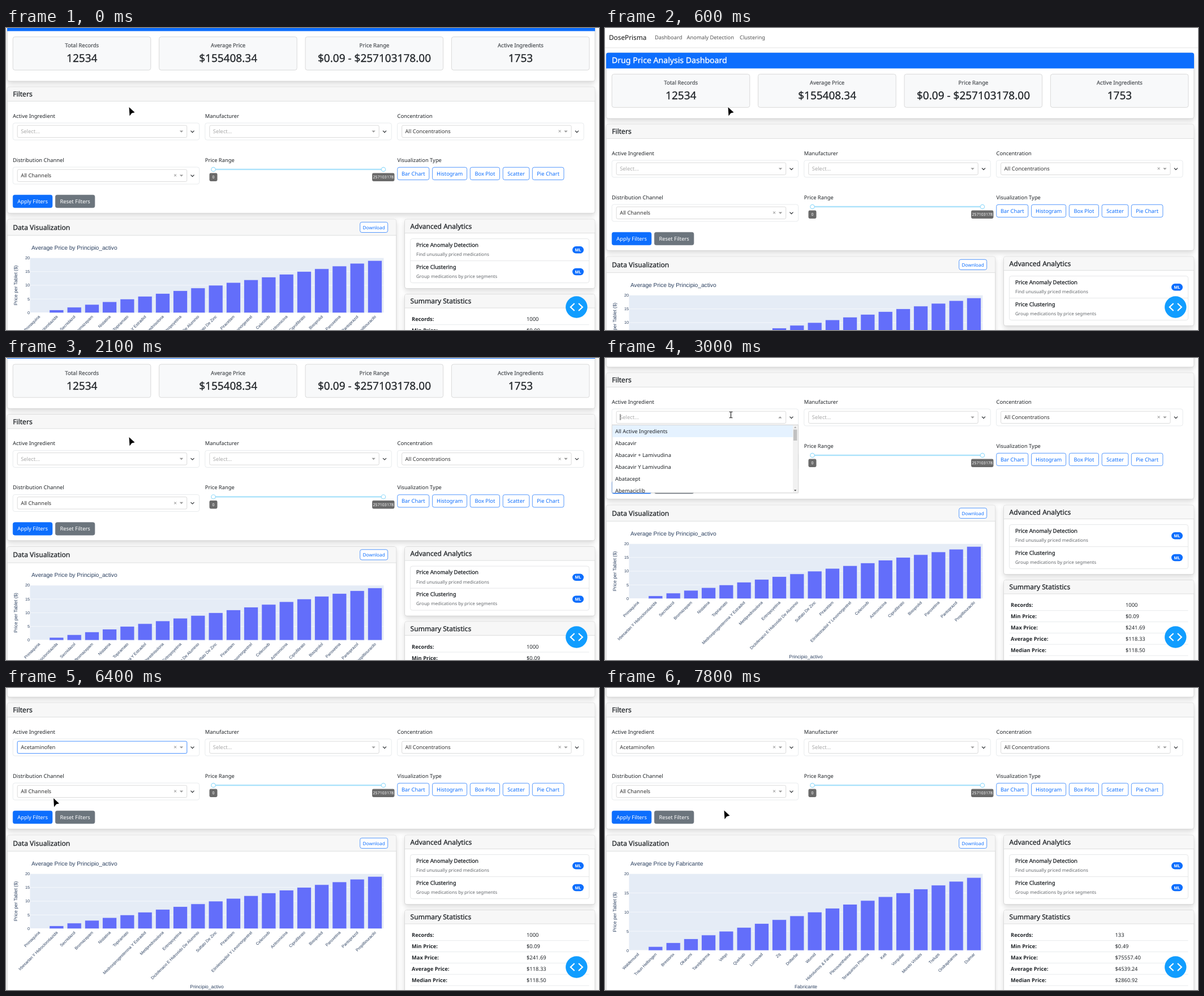
An HTML page that plays this animation: 1048x534 px, repeating every 8000 ms.

```html
<!DOCTYPE html>
<html lang="en">
<head>
<meta charset="utf-8">
<title>Drug Price Analysis Dashboard</title>
<style>
  html, body { margin: 0; width: 100%; height: 100%; overflow: hidden; background: #fff; }
  svg { display: block; width: 1048px; height: 534px; color: #212529; }
  text { font: 9.35px "Noto Sans", sans-serif; fill: currentColor; white-space: pre; text-rendering: geometricPrecision; }
  .medium { stroke: currentColor; stroke-width: .3px; }
  .bold { font-weight: 700; }
  .chart { font-family: "Liberation Sans", Arial, sans-serif; color: #2a3f5f; }
  .mid { text-anchor: middle; }
  .end { text-anchor: end; }
  .shadow { filter: drop-shadow(0 4.8px 4.8px rgba(0, 0, 0, .15)); }
</style>
</head>
<body>
<svg id="stage" viewBox="0 0 1048 534"></svg>
<script>
const LOOP = 8000, STEP = 100;
const BLUE = '#0d6efd', GRAY = '#6c757d', INK = '#212529', BORDER = '#d3d4d5';
const stage = document.getElementById('stage');

const INGREDIENTS = {
  title: 'Principio_activo', bottom: 569.5, valueX: 920,
  names: ['Primaquina', 'Irbesartan Y Hidroclorotiazida', 'Secnidazol', 'Bromazepam', 'Nistatina',
    'Topiramato', 'Medroxiprogesterona Y Estradiol', 'Metilprednisolona', 'Eritropoyetina',
    'Diclofenaco E Hidroxido De Aluminio', 'Sulfato De Zinc', 'Piracetam',
    'Etinilestradiol Y Levonorgestrel', 'Celecoxib', 'Azitromicina', 'Ciprofibrato', 'Bisoprolol',
    'Paroxetina', 'Pantoprazol', 'Propiltiouracilo'],
  stats: ['1000', '$0.09', '$241.69', '$118.33', '$118.50']
};
const MAKERS = {
  title: 'Fabricante', bottom: 608, valueX: 901.5,
  names: ['Waldemund', 'Traun Helbingen', 'Brestonix', 'Okarumi', 'Tarelpharma', 'Velqo', 'Quelvab',
    'Lumovad', 'Zq', 'Dolterfar', 'Wumid', 'Hidrolumos &amp; Farma', 'Plexovantheline',
    'Teraquinico Pharma', 'Kelt', 'Vorquilar', 'Morelo Vintalis', 'Trelups', 'Ondrapharma', 'Dulmar'],
  stats: ['133', '$0.49', '$75557.40', '$4539.24', '$2860.92']
};
const OPTIONS = {
  all: ['All Active Ingredients', 'Abacavir', 'Abacavir + Lamivudina', 'Abacavir Y Lamivudina', 'Abatacept', 'Abemaciclib'],
  ace: ['Acarbosa', 'Aceclofenaco', 'Acemetacina', 'Acetaminofen', 'Acetaminofen + Cafeina + Metocarbamol', 'Acetazolamida'],
  acet: ['', ' + Acido Acetilsalicilico + Cafeina', ' + Cafeina + Acido Acetilsalicilico',
    ' + Cafeina + Clorfeniramina', ' + Cafeina + Fenilefrina', ' + Cafeina + Feniñefrina'].map(s => 'Acetaminofen' + s)
};
// time, x, y of the pointer tip
const POINTER = [[0, 217.5, 140], [2100, 217.5, 140], [2400, 222.5, 100.5], [4900, 222.5, 100.5], [5200, 76, 154.5],
  [5400, 58, 146], [5700, 46, 131], [5900, 46, 131], [6400, 84, 195], [6800, 66, 223.5], [7500, 66, 223.5], [7800, 210.5, 216.5]];

const smooth = (from, to, t) => {
  const u = Math.min(1, Math.max(0, (t - from) / (to - from)));
  return u * u * (3 - 2 * u);
};

function pointerAt(t) {
  const next = POINTER.findIndex(k => k[0] > t);
  if (next < 0) return POINTER[POINTER.length - 1].slice(1);
  const [a, b] = [POINTER[next - 1], POINTER[next]], u = (t - a[0]) / (b[0] - a[0]);
  return [a[1] + (b[1] - a[1]) * u, a[2] + (b[2] - a[2]) * u];
}

const rect = (x, y, w, h, fill, stroke = 'none', r = 0, extra = '') =>
  `<rect x="${x}" y="${y}" width="${w}" height="${h}" fill="${fill}" stroke="${stroke}" stroke-width=".7" rx="${r}" ${extra}/>`;
const text = (x, y, s, cls = '', color = '', size = 9.35, extra = '') =>
  `<text x="${x}" y="${y}" class="${cls}" style="font-size:${size}px;${color && 'color:' + color}" ${extra}>${s}</text>`;
const path = (d, stroke, width = 1, fill = 'none', extra = '') =>
  `<path d="${d}" fill="${fill}" stroke="${stroke}" stroke-width="${width}" ${extra}/>`;
const group = (x, y, body) => `<g transform="translate(${x} ${y})">${body}</g>`;

const button = (x, y, w, h, label, fill, color, stroke = fill, size) =>
  rect(x, y, w, h, fill, stroke, 3.2) + text(x + w / 2, y + h / 2 + 3.4, label, 'mid', color, size);

function card(x, y, w, h, headHeight, title) {
  return rect(x, y, w, h, '#fff', '#ccc', 3.6, 'class="shadow"') +
    rect(x + .4, y + .4, w - .8, headHeight, '#f7f7f7', 'none', 3) +
    path(`M${x} ${y + headHeight}h${w}`, BORDER, .7) +
    text(x + 10, y + headHeight / 2 + 4.5, title, 'medium', INK, 12.05);
}

function select(x, y, value, { clear = !!value, focus = false, open = false, typed = '', caret = false } = {}) {
  const tip = open ? 'M294 16.6l3.2-3.4 3.2 3.4z' : 'M294.6 13.4l3.2 3.4 3.2-3.4z';
  return group(x, y,
    rect(0, 0, 329.5, 30, '#fff', '#dee2e6', 3.6) +
    (focus ? rect(7, 3.4, 301.5, 23, '#d6e8ff', 'none', 3) : '') +
    rect(8, 4.2, 299.5, 21.4, '#fff', focus ? '#1a75ff' : '#ccc', 2.4) +
    text(14, 18.1, value || typed || 'Select...', '', value ? '#333' : typed ? '#000' : '#aaa') +
    (caret ? rect(14.4 + 5 * typed.length, 9, .7, 11, '#000') : '') +
    (clear ? text(287, 18.3, '×', 'mid', '#888', 10) : '') +
    path(tip, 'none', 0, '#999') +
    path('M314.3 13.6l3 3 3-3', INK, 1.1));
}

function menu(options, active) {
  return rect(12.8, 262.6, 328.4, 119.6, '#fff', '#ccc', 0, 'style="filter:drop-shadow(0 .6px .8px rgba(0,0,0,.15))"') +
    rect(13.2, 263 + 21 * active, 319, 21, '#e5f2ff') +
    `<svg x="13" y="263" width="319" height="119">` +
    options.map((s, i) => text(5, 14.3 + 21 * i, s)).join('') + '</svg>' +
    rect(332, 263, 8.8, 118.8, '#f1f1f1') + rect(333, 270.5, 6.4, 19.5, '#c1c1c1') +
    path('M334 267.8l2.2-2.6 2.2 2.6z', 'none', 0, '#a3a3a3') +
    path('M334 377l2.2 2.6 2.2-2.6z', 'none', 0, '#505050');
}

function chart({ title, bottom, names }) {
  const left = 42.5, top = 472.4, width = 625, gap = width / 20, unit = (bottom - top) / 20;
  let out = text(45, 458, 'Average Price by ' + title, 'chart', '', 10.2) +
    rect(left, top, width, bottom - top, '#e5ecf6');
  for (let v = 0; v <= 20; v += 5) {
    const y = bottom - v * unit;
    out += path(`M${left} ${y}h${width}`, '#fff', v ? .6 : 1.2) + text(42, y + 2.5, v, 'chart end', '', 7.2);
  }
  names.forEach((name, i) => {
    const cx = left + gap * (i + .5), x = cx + 2.5, y = bottom + 7.5;
    out += rect(cx - gap * .4, bottom - i * unit, gap * .8, i * unit, '#636efa', '#e5ecf6') +
      text(x, y, name, 'chart end', '', 7.2, `transform="rotate(-45 ${x} ${y})"`);
  });
  const cy = (top + bottom) / 2;
  return out + text(20, cy, 'Price per Tablet ($)', 'chart mid', '', 8.4, `transform="rotate(-90 20 ${cy})"`) +
    text(355, 675, title, 'chart mid', '', 8.5);
}

function header() {
  const facts = [['Total Records', '12534'], ['Average Price', '$155408.34'],
    ['Price Range', '$0.09 - $257103178.00'], ['Active Ingredients', '1753']];
  return rect(0, -10, 1048, 44, '#fff', 'none', 0, 'style="filter:drop-shadow(0 1.2px 1.2px rgba(0,0,0,.1))"') +
    text(7, 20.8, 'DosePrisma', '', '#111', 11.8) +
    [[88, 'Dashboard'], [144.5, 'Anomaly Detection'], [238, 'Clustering']].map(([x, s]) => text(x, 20, s, '', '#555')).join('') +
    rect(2.3, 44, 1038.5, 116, '#fff', '#ccc', 3.6, 'class="shadow"') +
    path('M2 71.5V47.4q0-3.6 3.6-3.6H1037.4q3.6 0 3.6 3.6V71.5z', 'none', 0, BLUE) +
    text(12, 61.6, 'Drug Price Analysis Dashboard', 'medium', '#fff', 14.1) +
    facts.map(([label, value], i) => group(12.2 + 258.4 * i, 81.6,
      rect(0, 0, 243.6, 58.8, '#f8f9fa', '#ccc', 3.6) +
      text(122, 18.6, label, 'mid medium', '#585c60', 9.5) +
      text(122, 44.6, value, 'mid medium', INK, 19))).join('');
}

function filters(t, over) {
  const open = t >= 3000 && t < 5900, chosen = t >= 5900;
  const typed = open ? 'Acet'.slice(0, [3800, 4100, 4300, 4800].filter(k => t >= k).length) : '';
  const focus = t >= 2600 && t < 7000 && !open;
  const caret = open && !(t >= 3300 && t < 3800);
  const labels = ['Active Ingredient', 'Manufacturer', 'Concentration', 'Distribution Channel', 'Price Range', 'Visualization Type'];
  const kinds = [[691.8, 56, 'Bar Chart'], [753.6, 61, 'Histogram'], [820.3, 52.2, 'Box Plot'], [878.2, 46.6, 'Scatter'], [930.3, 55.6, 'Pie Chart']];
  const tag = (x, w, s) => rect(x - w / 2, 322.6, w, 14.4, '#6a6a6a', 'none', 2.4) + text(x, 332.4, s, 'mid', '#fff', 7.1);
  const knob = x => `<circle cx="${x}" cy="316" r="3.7" fill="#fff" stroke="#96dbfa" stroke-width="1.2"/>`;
  return card(2.3, 170.2, 1038.5, 223.2, 25.2, 'Filters') +
    labels.map((s, i) => text(12 + 339.75 * (i % 3), i < 3 ? 225 : 303, s)).join('') +
    select(12.2, 234, chosen ? 'Acetaminofen' : '', { focus, open, typed, caret }) +
    select(351.8, 234, '') + select(691.6, 234, 'All Concentrations') + select(12.2, 312, 'All Channels') +
    rect(366.5, 314.8, 300.5, 2.4, '#abe2fb') + knob(366.5) + knob(667) +
    tag(366.5, 14, '0') + tag(666.8, 39.4, '257103178') +
    kinds.map(([x, w, s]) => button(x, 312.3, w, 22.2, s, '#fff', BLUE, BLUE)).join('') +
    button(12.3, 361.3, 69.6, 22.4, 'Apply Filters', over === 'apply' ? '#0b5ed7' : BLUE, '#fff') +
    button(87.3, 361.3, 69.6, 22.4, 'Reset Filters', over === 'reset' ? '#5c636a' : GRAY, '#fff');
}

function analytics({ stats, valueX }) {
  const item = (y, title, note) => text(725, y, title, 'medium', INK, 9.55) + text(725, y + 16.2, note, '', '#65696d', 8.06) +
    rect(1001, y - .8, 20, 12.4, BLUE, 'none', 6.2) + text(1011, y + 8, 'ML', 'mid bold', '#fff', 7.2);
  const labels = ['Records:', 'Min Price:', 'Max Price:', 'Average Price:', 'Median Price:'];
  return card(704.6, 404.2, 336.2, 122.4, 24.4, 'Advanced Analytics') +
    rect(714.6, 438.6, 316, 78, '#fff', '#dcdddf', 3.6) + path('M714.6 477.6h316', '#dcdddf', .7) +
    item(452.9, 'Price Anomaly Detection', 'Find unusually priced medications') +
    item(491.6, 'Price Clustering', 'Group medications by price segments') +
    card(704.6, 536.6, 336.2, 200, 24.4, 'Summary Statistics') +
    labels.map((s, i) => text(717, 584.2 + 19.9 * i, s, 'bold', INK, 9.3) + text(valueX, 584.2 + 19.9 * i, stats[i]) +
      path(`M714.6 ${590.6 + 19.9 * i}h316`, '#dee2e6', .7)).join('');
}

function pointer(x, y, kind) {
  const shapes = {
    arrow: path('M0 0L10 9.3 4.8 10.6 1 15.6z', '#fff', 1.4, '#000', 'paint-order="stroke" stroke-linejoin="round"'),
    beam: path('M-2.8-5.2h2q.8 0 .8.8v8.8q0 .8-.8.8h-2M2.8-5.2h-2q-.8 0-.8.8v8.8q0 .8.8.8h2', '#000', 1),
    hand: path('M-1 1q1-1.6 2 0v4.2l4.8 1q1 .3.8 1.6l-.8 4.2-.6 1.5h-5.2l-1-1.6-3-3.6q0-1.6 1.6-.8l1.4.8z',
      '#fff', 1.4, '#000', 'paint-order="stroke" stroke-linejoin="round"')
  };
  return group(x, y, shapes[kind]);
}

function scene(t) {
  const scroll = t < 1800 ? 66 * (1 - smooth(310, 600, t)) : 144 * smooth(1808, 2400, t);
  const data = t < 7200 ? INGREDIENTS : MAKERS;
  const open = t >= 3000 && t < 5900;
  const [x, y] = pointerAt(t);
  const onButtons = t > 6000 && y >= 217 && y < 240;
  const over = onButtons && x > 12 && x < 82 ? 'apply' : onButtons && x > 87 && x < 157 ? 'reset' : '';
  const kind = over || (open && y > 118.5) ? 'hand' : t >= 2400 && y < 116 ? 'beam' : 'arrow';
  const options = t < 4300 ? OPTIONS.all : t < 4800 ? OPTIONS.ace : OPTIONS.acet;
  return group(0, -scroll,
    header() + filters(t, over) +
    card(2.3, 404.2, 687.4, 320, 28.4, 'Data Visualization') +
    button(625.7, 409.3, 49, 18.2, 'Download', '#fff', BLUE, BLUE, 8.26) +
    chart(data) + analytics(data) +
    (open ? menu(options, t >= 5300 && t < 5600 ? 1 : 0) : '')) +
    '<circle cx="1008.3" cy="493.5" r="19.2" fill="#119dff"/>' +
    path('M1004.6 487l-6.8 6.5 6.8 6.5M1012 487l6.8 6.5-6.8 6.5', '#fff', 2.2) +
    pointer(x, y, kind);
}

const start = performance.now();
let shown = -1;
function frame() {
  const t = Math.floor((performance.now() - start) % LOOP / STEP) * STEP;
  if (t !== shown) stage.innerHTML = scene(shown = t);
  requestAnimationFrame(frame);
}
frame();
</script>
</body>
</html>
```
